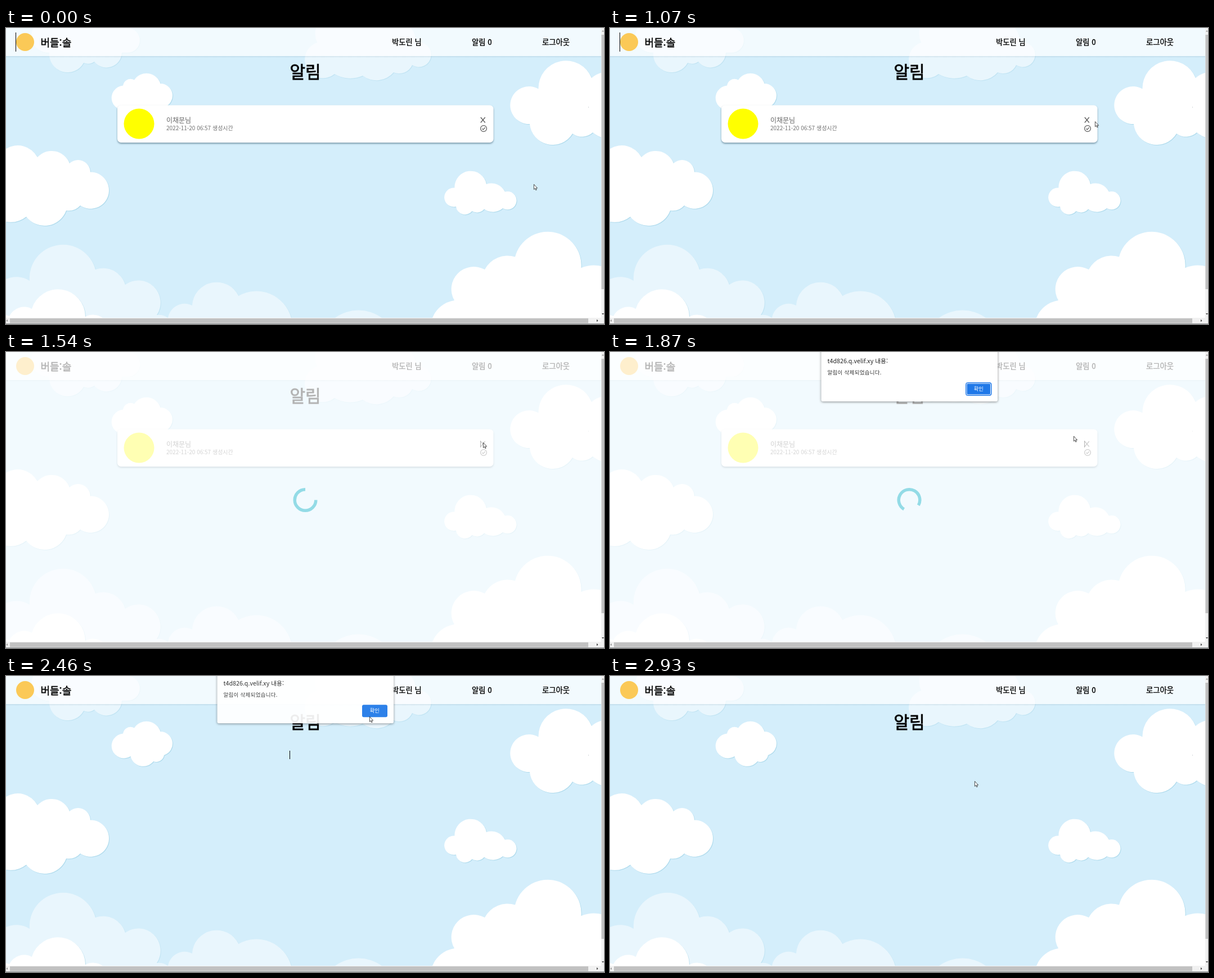
An HTML page that plays this animation: 1063x527 px, repeating every 3080 ms.

```html
<!DOCTYPE html>
<html lang="ko">
<head>
<meta charset="utf-8">
<title>알림</title>
<style>
  html, body { margin: 0; width: 100%; height: 100%; overflow: hidden; background: #d4eefb; }
  svg { display: block; }
  text { font-family: "Noto Sans CJK KR", "Noto Sans", sans-serif; }
  .cloud { fill: #fff; filter: drop-shadow(1.7px 1.7px .7px rgba(120, 190, 215, .4)); }
  .pale { opacity: .5; }
  .header { fill: rgba(255, 255, 255, .7); }
  .medium { stroke: #000; stroke-width: .027em; }
  .brand { font-size: 18px; }
  .nav { font-size: 13.3px; }
  .title { font-size: 30px; text-anchor: middle; }
  .who { font-size: 12px; fill: #666; }
  .when { font-size: 10px; fill: #707070; }
  .card { fill: #fff; filter: drop-shadow(0 2px 1.8px rgba(40, 75, 95, .5)); }
  .icon { fill: none; stroke: #555; stroke-width: 1.2; }
  .panel { fill: #fff; filter: drop-shadow(0 1px 2px rgba(0, 0, 0, .45)); }
  .site { font-size: 10.7px; fill: #222; }
  .message { font-size: 9.5px; letter-spacing: .3px; fill: #333; }
  .ok { font-size: 9.3px; fill: #fff; text-anchor: middle; }
</style>
</head>
<body>
<svg width="1063" height="527" viewBox="0 0 1063 527">
  <defs>
    <clipPath id="view"><path d="M0 0H1058V516H0Z"/></clipPath>
    <clipPath id="button"><rect x="633" y="55" width="45" height="22" rx="3"/></clipPath>
    <linearGradient id="edge" x2="0" y2="1">
      <stop stop-color="#5a8296" stop-opacity=".17"/>
      <stop offset="1" stop-color="#5a8296" stop-opacity="0"/>
    </linearGradient>
  </defs>

  <g clip-path="url(#view)">
    <path fill="#d4eefb" d="M0 0H1058V516H0Z"/>

    <g class="pale">
      <path class="cloud" d="M52 -5A30 30 0 0 0 77 44A32.5 32.5 0 0 0 138 62A20 20 0 0 0 157 60A27.5 27.5 0 0 0 206 44H216A22 22 0 0 0 216 0Z"/>
      <path class="cloud" d="M551 0A40 40 0 0 0 553 26A32.5 32.5 0 1 0 584 82A55 55 0 0 0 634 85A40 40 0 0 0 689 79A25 25 0 0 0 722 66A22 22 0 1 0 729 26A40 40 0 0 0 720 0Z"/>
      <path class="cloud" d="M0 447A45 45 0 0 1 42 450A59.6 59.6 0 0 1 159 430A41 41 0 0 1 212 457A39.5 39.5 0 0 1 268 511A30 30 0 0 1 288 516A30 30 0 0 1 331 494A43.5 43.5 0 0 1 413.5 477A64 64 0 0 1 507 516V530H0Z"/>
      <path class="cloud" d="M585 516A71 71 0 0 1 668 516V530H585Z"/>
    </g>

    <path class="cloud" d="M0 215A40 40 0 0 1 56 230A34 34 0 0 1 113 241A22 22 0 0 1 150 256.5A32.6 32.6 0 1 1 132 316A28 28 0 0 1 107 325A41 41 0 0 1 36 336A45 45 0 0 1 0 345Z"/>
    <path class="cloud" d="M208 102.5A13.5 13.5 0 0 1 228 92.5A26 26 0 0 1 274.5 99A21.5 21.5 0 0 1 281 141A14 14 0 0 1 262 152A23 23 0 0 1 221.5 143A22 22 0 1 1 208 102.5Z"/>
    <path class="cloud" d="M797.5 284.5A28.5 28.5 0 0 1 854 278A27 27 0 0 1 887 291.5A16.2 16.2 0 1 1 883 321A27 27 0 0 1 850 322.5A17 17 0 0 1 828.5 326A16 16 0 0 1 800 318A17 17 0 1 1 797.5 284.5Z"/>
    <path class="cloud" d="M946.5 108.5A49 49 0 0 1 1041 89A40 40 0 0 1 1062 79V196A50 50 0 0 1 1043 186A28 28 0 0 1 1007 188A41 41 0 0 1 931 171A33.5 33.5 0 1 1 946.5 108.5Z"/>
    <path class="cloud" d="M758 516A50 50 0 0 1 797 485A40 40 0 0 1 851 430A46 46 0 0 1 905 407.5A59.8 59.8 0 0 1 1022.5 427A60 60 0 0 1 1062 425V530H758Z"/>
    <path class="cloud" d="M0 511L6 513A29 29 0 0 1 46 500A48.5 48.5 0 0 1 141 514A30 30 0 0 1 172 516V530H0Z"/>
    <path fill="#d5d9db" d="M1035 140h1v2h-1z"/>

    <path class="header" d="M0 0H1058V50H0Z"/>
    <path fill="url(#edge)" d="M0 50H1058V53H0Z"/>
    <circle cx="34" cy="25" r="16" fill="#fbc957"/>
    <text class="medium brand" x="61.5" y="32.5">버들:솔</text>
    <text class="medium nav" x="686" y="30">박도린 님</text>
    <text class="medium nav" x="828" y="30">알림 0</text>
    <text class="medium nav" x="953" y="30">로그아웃</text>
    <text class="medium title" id="title" x="532" y="88.5">알림</text>

    <g id="card">
      <rect class="card" x="198" y="137.5" width="668.5" height="66.5" rx="6.5"/>
      <circle cx="236.5" cy="170.5" r="27" fill="#ff0"/>
      <text class="who" x="285" y="169">이채문님</text>
      <text class="when" x="285" y="182">2022-11-20 06:57 생성시간</text>
      <path class="icon" d="M843.8 159L851.7 168.5M851.7 159L843.8 168.5"/>
      <circle class="icon" cx="849" cy="179" r="5.4"/>
      <path class="icon" d="M846.4 179.2L848.3 181L851.7 177.2"/>
    </g>

    <rect id="caret" width="1"/>

    <g id="loading">
      <path fill="#fff" opacity=".7" d="M0 0H1058V516H0Z"/>
      <path id="spinner" fill="none" stroke="#93dbe6" stroke-width="5.5" d="M550.8 263.5A18.8 18.8 0 1 1 532 244.7"/>
    </g>
  </g>

  <path fill="#f1f1f1" d="M1058 0H1063V527H1058ZM0 516H1063V526H0Z"/>
  <rect id="thumb" x="1058.5" y="12" width="4.5" fill="#c1c1c1"/>
  <path fill="#c1c1c1" d="M7 517H1035V525.5H7Z"/>
  <path fill="#999" d="M3 518.8V523.2L.6 521ZM1059 6.5H1063L1061 4Z"/>
  <path fill="#444" d="M1050 518.8V523.2L1052.6 521ZM1059 508H1063L1061 510.5Z"/>
  <path fill="#8f9394" d="M0 526H1063V527H0Z"/>

  <g id="dialog">
    <rect class="panel" x="375.5" y="-10" width="313.5" height="98" rx="3"/>
    <text class="site" x="386.5" y="20.3">t4d826.q.velif.xy 내용:</text>
    <text class="message" x="386.5" y="40.3">알림이 삭제되었습니다.</text>
    <rect x="633" y="55" width="45" height="22" rx="3" fill="#1f78e8"/>
    <g id="focus" fill="none">
      <rect x="632.5" y="54.5" width="45.5" height="23" rx="3" stroke="#1f78e8"/>
      <rect x="634" y="56" width="42.5" height="20" rx="2" stroke="#fff"/>
    </g>
    <circle id="press" cx="647" cy="71" r="11" fill="#7b8fae" opacity=".6" clip-path="url(#button)"/>
    <text class="ok" x="655.3" y="69.2">확인</text>
  </g>

  <circle id="click" cx="848.3" cy="162" r="9" fill="#ff0" opacity=".5"/>
  <path id="cursor" fill="#fff" stroke="#222" stroke-width=".8" d="M.4 .4V9.4L2.4 7.6L3.8 10.7L5.2 10.1L3.8 7.1H6.6Z"/>
</svg>

<script>
  const LOOP = 3080, FPS = 15;
  const CLICK = 22, LOAD = 23, ALERT = 26, CONFIRM = 36, DONE = 37, LAST = 44;
  const $ = id => document.getElementById(id);
  const show = (id, on) => $(id).setAttribute('visibility', on ? 'visible' : 'hidden');
  const set = (id, attrs) => {
    for (const name in attrs) $(id).setAttribute(name, attrs[name]);
  };

  // Pointer stops: tick, x, y
  const stops = [
    [0, 938, 278], [4, 934, 270], [8, 925, 253], [10, 896, 185], [13, 874, 170],
    [17, 858, 165], [19, 848, 161], [27, 848, 161], [29, 800, 138], [32, 690, 90],
    [34, 648, 74], [35, 646, 72], [37, 646, 72], [39, 647, 105], [42, 648, 172], [44, 648, 187]
  ];

  function pointer(k) {
    const i = Math.max(1, stops.findIndex(s => s[0] >= k));
    const [a, ax, ay] = stops[i - 1], [b, bx, by] = stops[i];
    const p = (k - a) / (b - a);
    return [ax + (bx - ax) * p, ay + (by - ay) * p];
  }

  // Blinking text caret: x, y, height
  function caretAt(k) {
    if (k < 8 || (k >= 16 && k < CLICK)) return [17, 8, 34];
    if (k >= CLICK && k < DONE) return [843, 158, 12];
    if (k >= DONE && k < LAST) return [504, 133, 15];
    return null;
  }

  // Dialog opacity and vertical shift
  function dialogAt(k) {
    if (k < ALERT || k > DONE + 1) return [0, 0];
    if (k === ALERT) return [.5, -4];
    if (k < DONE) return [1, 0];
    return k === DONE ? [.93, -3.7] : [.3, -8];
  }

  function draw(t) {
    const k = Math.min(LAST, Math.floor((t + 7) * FPS / 1000));
    const done = k >= DONE;

    const [x, y] = pointer(k);
    set('cursor', { transform: `translate(${x} ${y})` });

    const caret = caretAt(k);
    show('caret', caret);
    if (caret) set('caret', { x: caret[0], y: caret[1], height: caret[2] });

    show('click', k === CLICK);
    show('card', !done);
    show('loading', k >= LOAD && !done);
    set('spinner', { transform: `rotate(${(k - LOAD) * 360 / FPS} 532 263.5)` });
    set('title', { y: done ? 92.5 : 88.5 });
    set('thumb', { height: done ? 456 : 453 });

    const [opacity, shift] = dialogAt(k);
    set('dialog', { opacity, transform: `translate(0 ${shift})` });
    // Children marked visible would ignore a hidden parent, so opacity hides the dialog
    show('focus', !done);
    show('press', k === CONFIRM);
  }

  let start;
  function tick(now) {
    start ??= now;
    draw((now - start) % LOOP);
    requestAnimationFrame(tick);
  }
  draw(0);
  requestAnimationFrame(tick);
</script>
</body>
</html>
```
